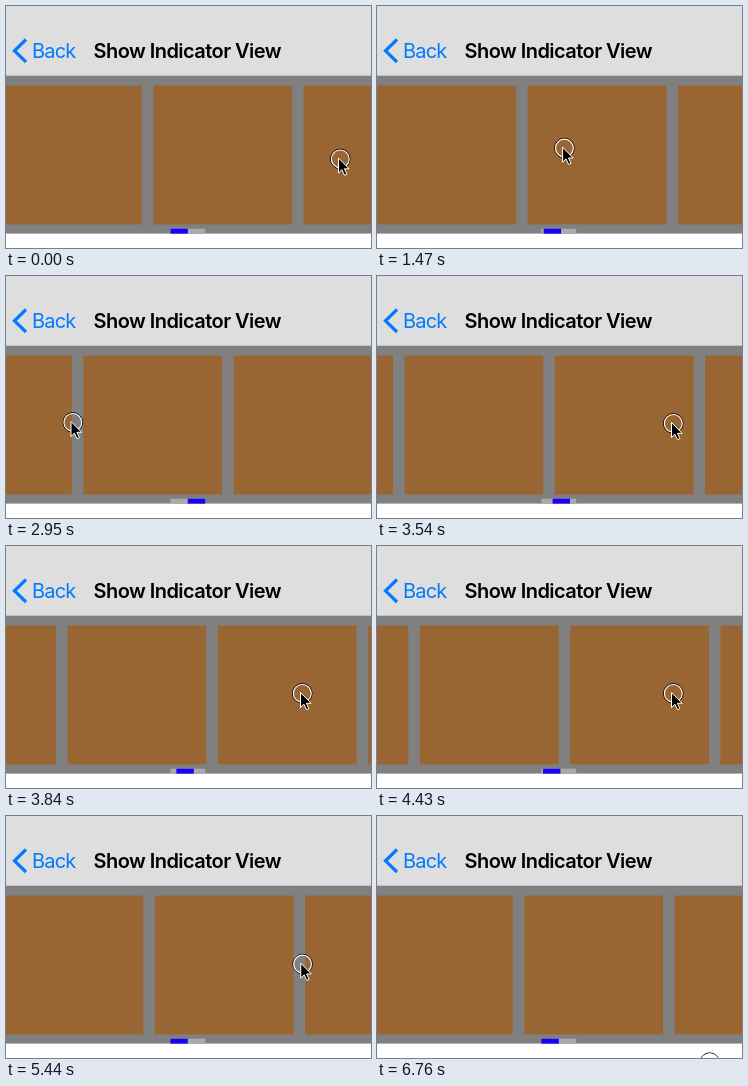
Recreate the animation shown at these times as an HTML page. Size 365x242 px, loop 6950 ms.

```html
<!DOCTYPE html>
<html lang="en">
<head>
<meta charset="utf-8">
<title>Show Indicator View</title>
<style>
  html, body { margin: 0; width: 100%; height: 100%; overflow: hidden; background: #fff; }
  svg { display: block; width: 100vw; height: 100vh; }
  text { font: 20px Inter, Roboto, sans-serif; }
  .title { font-weight: 600; letter-spacing: -.55px; text-anchor: middle; }
  .back { fill: #007aff; letter-spacing: -.8px; }
</style>
</head>
<body>
<svg viewBox="0 0 365 242">
  <rect width="365" height="242" fill="#fff"/>
  <rect width="365" height="70" fill="#dedede"/>
  <path d="M20 33.5 8.5 44.8 20 56" fill="none" stroke="#007aff" stroke-width="3.2"/>
  <text class="back" x="26" y="52">Back</text>
  <text class="title" x="181.3" y="52">Show Indicator View</text>
  <rect y="69.7" width="365" height="157.9" fill="#808080"/>
  <g id="cards" fill="#996633"></g>
  <rect x="164.4" y="222.7" width="34.8" height="4.9" fill="#aaa"/>
  <rect id="thumb" x="164.4" y="222.7" width="17.4" height="4.9" fill="#1a00ff"/>
  <g id="cursor">
    <g fill="none" transform="translate(-.2 -.6)">
      <circle r="9.8" stroke="#000"/>
      <circle r="8.9" stroke="#fff" stroke-width="1.1"/>
    </g>
    <path d="M-2-1.5v15l3.4-3.3 2.6 5.6 2.4-1.1-2.5-5.4h4.7z" fill="#000" stroke="#fff"/>
  </g>
</svg>
<script>
const LOOP = 6950, START = 1320, STEPS = 38;
const MAX = 1122, PITCH = 150.3, TRACK = 17.4;
const DECAY = 0.5, SPRING = 10;
const $ = id => document.getElementById(id);

for (let i = 0; i < 10; i++) {
  const card = document.createElementNS('http://www.w3.org/2000/svg', 'rect');
  const box = { x: i * PITCH - 3, y: 79.5, width: 138.8, height: 139 };
  for (const key in box) card.setAttribute(key, box[key]);
  $('cards').append(card);
}

// The picture is sampled every 150 ms, with regular shorter steps.
const ticks = [0];
for (let i = 0, t = START; i < STEPS; i++) {
  ticks.push(t);
  t += i > 4 && i % (i < 20 ? 4 : 2) === 1 ? 140 : 150;
}

// Pointer moves; those with an edge drag the cards and fling them towards it.
const home = { x: 334.5, y: 153.5 };
const moves = [
  { begin: 1254, end: 1500, x: 117.5, y: 137.5, power: 3, rest: 0, edge: MAX },
  { begin: 2100, end: 2700, x: 67, y: 147, power: 1 },
  { begin: 3059, end: 3436, x: 296.5, y: 148, power: 3, rest: MAX, edge: 0 },
  { begin: 5200, end: 6760, x: 333.5, y: 249, power: 2.7 }
];
moves.forEach((m, i) => m.from = moves[i - 1] || home);

const progress = (m, t) => Math.min(1, (t - m.begin) / (m.end - m.begin)) ** m.power;

function pointer(t) {
  const m = moves.findLast(m => t >= m.begin);
  if (!m) return [home.x, home.y];
  const u = progress(m, t);
  return ['x', 'y'].map(k => m.from[k] + (m[k] - m.from[k]) * u);
}

// Drag, then exponential slowdown, then a critically damped bounce at the edge.
function scroll(t) {
  const m = moves.findLast(m => 'edge' in m && t >= m.begin);
  if (!m) return 0;
  const pull = m.from.x - m.x;
  const x = m.rest + pull * progress(m, t);
  if (t < m.end) return x;
  const v = 1000 * m.power * pull / (m.end - m.begin);
  const glide = v * DECAY;
  const left = 1 - (m.edge - x) / glide;
  const s = (t - m.end) / 1000;
  const b = s + DECAY * Math.log(left);
  if (b < 0) return x + glide * (1 - Math.exp(-s / DECAY));
  return m.edge + v * left * b * Math.exp(-SPRING * b);
}

const move = (id, x, y = 0) => $(id).setAttribute('transform', `translate(${x} ${y})`);

function draw(now) {
  const time = now % LOOP;
  const t = ticks.findLast(k => k <= time);
  const x = scroll(t);
  move('cards', -x);
  move('thumb', x / MAX * TRACK);
  move('cursor', ...pointer(t));
}

const origin = performance.now();
function frame() {
  draw(performance.now() - origin);
  requestAnimationFrame(frame);
}
frame();
</script>
</body>
</html>
```
